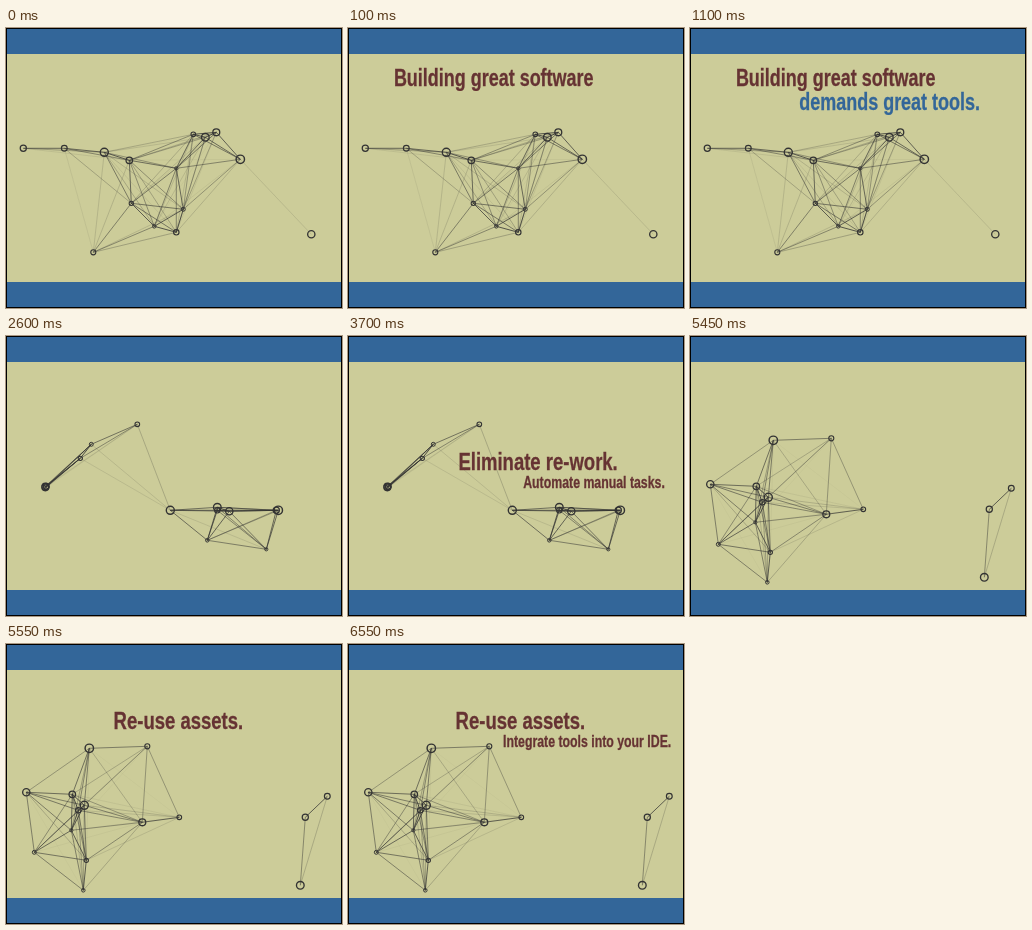
Recreate the animation shown at these times as an HTML page. Size 336 by 280 pixels, loop 8000 ms.

```html
<!DOCTYPE html>
<html lang="en">
<head>
<meta charset="utf-8">
<title>Great tools</title>
<style>
  html, body { margin: 0; width: 100%; height: 100%; overflow: hidden; background: #cc9; }
  svg { display: block; width: 336px; height: 280px; }
  text { font: bold 23.5px "Liberation Sans", Arial, sans-serif; fill: #633; stroke: #633; stroke-width: .3px; opacity: 0; animation: show 8s step-end infinite; }
  text.mid { font-size: 24.2px; }
  text.small { font-size: 16.1px; }
  text.blue { fill: #369; stroke: #369; }
  line, circle { stroke: #333; fill: none; }
  line { stroke-width: .9px; }
  .scene { opacity: 0; animation: 8s step-end infinite; }
  #build { animation-name: first; }
  #automate { animation-name: second; }
  #reuse { animation-name: third; }
  @keyframes first { 0% { opacity: 1 } 32.5%, 100% { opacity: 0 } }
  @keyframes second { 0% { opacity: 0 } 32.5% { opacity: 1 } 68.125%, 100% { opacity: 0 } }
  @keyframes third { 0% { opacity: 0 } 68.125%, 100% { opacity: 1 } }
  @keyframes show { 0% { opacity: 1 } 36.25%, 100% { opacity: 0 } }
</style>
</head>
<body>
<svg viewBox="0 0 336 280">
  <rect width="336" height="280" fill="#cc9"/>
  <path d="M0 0H336V26H0ZM0 254H336V280H0Z" fill="#369"/>
  <g id="build" class="scene"></g>
  <g id="automate" class="scene"></g>
  <g id="reuse" class="scene"></g>
  <rect x=".5" y=".5" width="335" height="279" fill="none" stroke="#000"/>
</svg>
<script>
// Each scene places the same set of nodes, ordered from largest to smallest.
const scenes = {
  build: {
    points: "234,131 98,124 199,109 305,206 210,104 123,132 17,120 58,120 170,204 87,224 187,106 125,175 177,181 148,198 170,140",
    lines: [
      ["Building great software", 45.9, 58, 100, ""],
      ["demands great tools.", 109.3, 82, 1100, "blue"]
    ]
  },
  automate: {
    points: "272,174 164,174 211,171 223,175 39,151 39,150 270,174 40,150 211,174 40,151 131,88 74,122 85,108 201,204 260,213",
    lines: [
      ["Eliminate re-work.", 110.4, 134.3, 2700, "mid"],
      ["Automate manual tasks.", 175.2, 151.8, 3700, "small"]
    ]
  },
  reuse: {
    points: "83,104 78,161 294,241 20,148 136,178 66,150 299,173 321,152 72,166 141,102 173,173 80,216 28,208 77,246 65,186",
    lines: [
      ["Re-use assets.", 107.6, 85.3, 5550, "mid"],
      ["Integrate tools into your IDE.", 155, 102.5, 6550, "small"]
    ]
  }
};

const reach = 116;
const condensed = 0.765;

const drawNode = ([x, y], index, { length }) => {
  const radius = 4.2 - 2.6 * index / (length - 1);
  return `<circle cx="${x}" cy="${y}" r="${radius}" stroke-width="${0.6 + radius * 0.2}"/>`;
};

// Nodes within reach are joined, and the line fades with distance.
const drawLink = ([x1, y1], [x2, y2]) => {
  const distance = Math.hypot(x2 - x1, y2 - y1);
  if (distance >= reach) return "";
  const opacity = 1 - (distance / reach) ** 1.3;
  return `<line x1="${x1}" y1="${y1}" x2="${x2}" y2="${y2}" opacity="${opacity}"/>`;
};

const drawText = ([words, x, y, start, style]) =>
  `<text class="${style}" transform="translate(${x} ${y}) scale(${condensed} 1)" style="animation-delay:${start}ms">${words}</text>`;

for (const [id, { points, lines }] of Object.entries(scenes)) {
  const nodes = points.split(" ").map(point => point.split(",").map(value => +value + 0.3));
  const links = nodes.flatMap((node, i) => nodes.slice(i + 1).map(other => drawLink(node, other)));
  document.getElementById(id).innerHTML =
    [...links, ...nodes.map(drawNode), ...lines.map(drawText)].join("");
}
</script>
</body>
</html>
```
